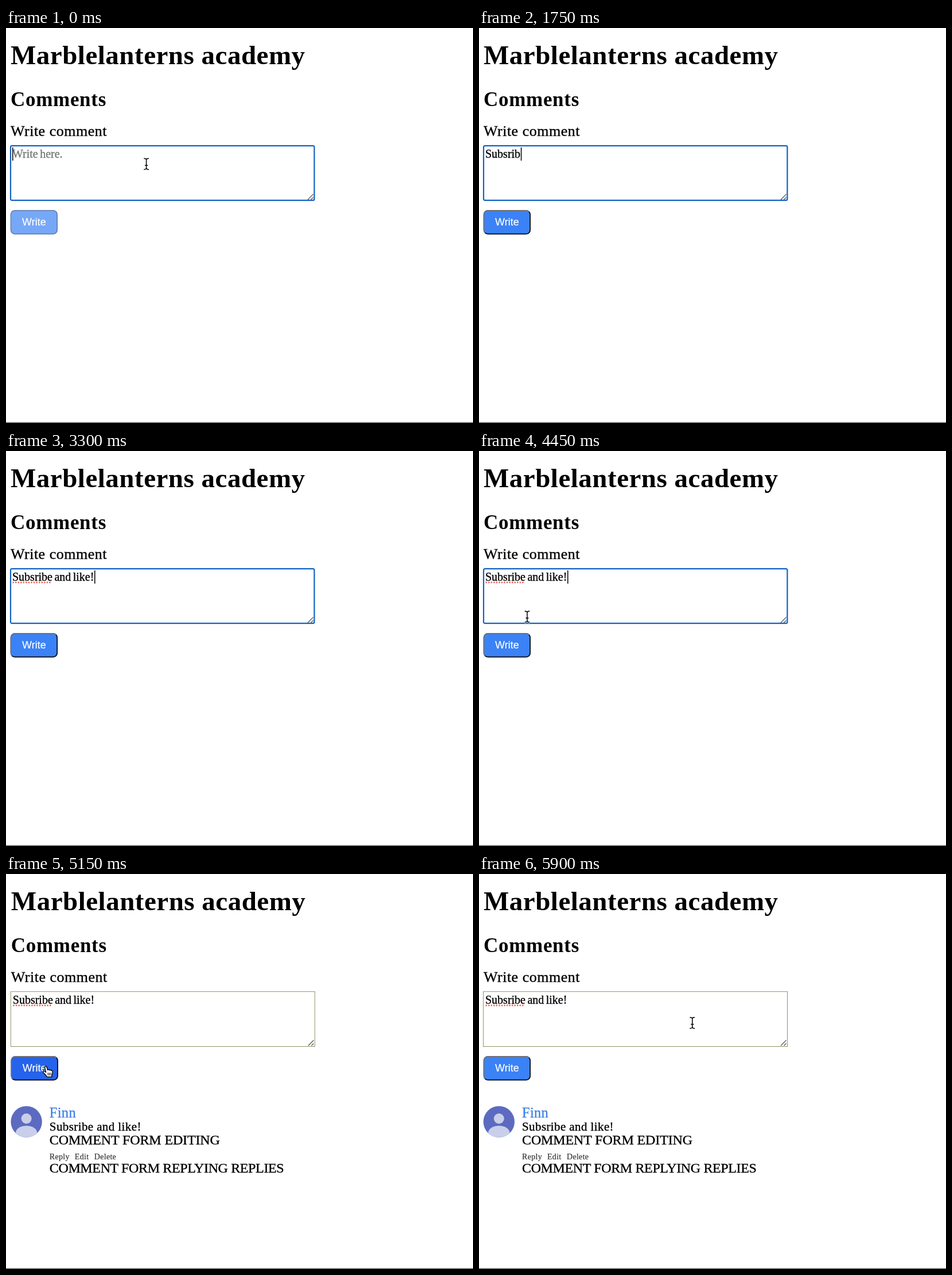
An HTML page for the animation above (6 s loop, 814 by 688 pixels).

```html
<!DOCTYPE html>
<html lang="en">
<head>
<meta charset="utf-8">
<title>Comments</title>
<style>
html, body { margin: 0; width: 100%; height: 100%; overflow: hidden; background: #fff; }
svg { display: block; }
text { font-family: "Liberation Serif", serif; white-space: pre; }
.ink { stroke: #000; stroke-width: .35; }
.field { font-size: 20px; word-spacing: -1.6px; }
.small text { font-size: 14px; letter-spacing: .3px; fill: #333; stroke: #333; stroke-width: .2; }
</style>
</head>
<body>
<svg width="814" height="688" viewBox="0 0 814 688">
  <defs>
    <clipPath id="round"><circle cx="34.8" cy="431.5" r="27.2"/></clipPath>
    <path id="beamShape" d="M-3.8 -9.6Q0 -9.6 0 -7Q0 -9.6 3.8 -9.6M0 -7V7M-3.8 9.6Q0 9.6 0 7Q0 9.6 3.8 9.6M-2 2.5H2"/>
  </defs>
  <rect width="814" height="688" fill="#fff"/>
  <g id="page">
    <text x="8" y="63" font-size="47" font-weight="bold" letter-spacing=".5">Marblelanterns academy</text>
    <text x="8" y="136" font-size="35" font-weight="bold" letter-spacing=".7">Comments</text>
    <text class="ink" x="8" y="188" font-size="26" letter-spacing=".5">Write comment</text>

    <rect id="box" fill="#fff"/>
    <path d="M526 299L535.5 289.5M531.5 299L535.5 295" stroke="#555" stroke-width="1.2"/>
    <text id="hint" class="field" x="11" y="226" fill="#757575" stroke="#757575" stroke-width=".3">Write here.</text>
    <text id="typed" class="field ink" x="11" y="226"></text>
    <path id="spell" d="M12.7 229H77.5" stroke="#f0625c" stroke-width="2.8" stroke-linecap="round" stroke-dasharray="0 4.55"/>
    <rect id="caret" y="208" width="1.5" height="23"/>

    <g id="button">
      <rect id="face" x="7.6" y="317" width="82.4" height="42.6" rx="8"/>
      <g fill="none" stroke-width="1.8">
        <path id="lit" d="M10.6 356.6A7.2 7.2 0 0 1 8.5 351.5V325.2A7.2 7.2 0 0 1 15.7 318H82A7.2 7.2 0 0 1 87.1 320.1"/>
        <path id="shade" d="M87.1 320.1A7.2 7.2 0 0 1 89.2 325.2V351.5A7.2 7.2 0 0 1 82 358.7H15.7A7.2 7.2 0 0 1 10.6 356.6"/>
      </g>
      <text x="28" y="344" font-size="18" fill="#fff" stroke="#fff" stroke-width=".2" style="font-family:'Liberation Sans',sans-serif">Write</text>
    </g>

    <g id="comment">
      <g clip-path="url(#round)">
        <rect x="7" y="404" width="56" height="56" fill="#5c6bc0"/>
        <g fill="#c9cfea">
          <circle cx="34.8" cy="426" r="9"/>
          <path d="M16 460V451C16 443 26 438.5 34.8 438.5S53.5 443 53.5 451V460Z"/>
        </g>
      </g>
      <text x="75" y="424" font-size="24.5" letter-spacing=".3" fill="#3b7fe4" stroke="#3b7fe4" stroke-width=".3">Finn</text>
      <g class="ink">
        <text x="75" y="447" font-size="21" letter-spacing=".4">Subsribe and like!</text>
        <text x="75" y="471" font-size="24" letter-spacing="-.13">COMMENT FORM EDITING</text>
        <text x="75" y="520" font-size="24" letter-spacing="-.37">COMMENT FORM REPLYING REPLIES</text>
      </g>
      <g class="small">
        <text x="75" y="497">Reply</text>
        <text x="119" y="497">Edit</text>
        <text x="153" y="497">Delete</text>
      </g>
    </g>
  </g>
  <rect y="686.6" width="814" height="1.4" fill="#666"/>

  <g id="pointer" stroke-linecap="round" stroke-linejoin="round">
    <g id="beam" fill="none">
      <use href="#beamShape" stroke="#fff" stroke-width="3.2"/>
      <use href="#beamShape" stroke="#000" stroke-width="1.5"/>
    </g>
    <path id="arrow" d="M0 0V16L3.8 12.5L6.4 18.4L9 17.2L6.5 11.5H11.5Z" fill="#000" stroke="#fff" stroke-width="1.2"/>
    <g id="hand">
      <path d="M-1.6 1.2C-1.2 -.6 1.2 -.6 1.8 1L3.8 6.5C4.6 5 6.5 5.2 7 6.8C7.8 5.6 9.6 6 9.9 7.6C11.2 6.8 12.3 7.6 12.2 9.4C12.2 12 11.6 13.4 11 15V18.4H2.4C1.4 15.6 -1.8 13.4 -4 10.6C-5.2 9 -3.2 7.6 -1.6 8.8L.6 10.4Z" fill="#fff" stroke="#000" stroke-width="1.4"/>
      <path d="M4.2 11.5V15.5M6.6 11.5V15.5M9 11.5V15.5" stroke="#000" stroke-width="1"/>
    </g>
  </g>
</svg>
<script>
const LOOP = 6000, STEP = 50;
const MESSAGE = "Subsribe and like!";
// time at which each character of the message is typed
const KEYS = [50, 600, 700, 800, 1000, 1250, 1750, 1900, 1950, 2100,
  2200, 2250, 2400, 2500, 2750, 3000, 3050, 3300];
const HIDE = 50, SHOW = 3450, PRESS = 4750, POST = 4950, SETTLE = 5200;
// time, x, y
const PATH = [
  [0, 244.6, 236.8], [3450, 244.6, 236.8], [3700, 135, 270], [4050, 63, 290],
  [4100, 60, 303], [4200, 60, 308], [4300, 72, 306], [4450, 84, 288.5],
  [4600, 76, 322], [4700, 63, 336], [4750, 60, 338], [4950, 60, 338],
  [5050, 68, 336], [5150, 69, 335], [5300, 120, 306], [5450, 230, 280],
  [5700, 341, 259], [5750, 341, 259], [5900, 371.8, 259.3], [6000, 371.8, 259.3]
];

const el = {};
document.querySelectorAll("[id]").forEach(n => el[n.id] = n);
const show = (n, on) => n.setAttribute("visibility", on ? "inherit" : "hidden");
const set = (n, attrs) => {
  for (const k in attrs) n.setAttribute(k, attrs[k]);
};

function pointerAt(t) {
  const i = PATH.findIndex(p => p[0] > t);
  const [t0, x0, y0] = PATH[i - 1], [t1, x1, y1] = PATH[i];
  const k = (t - t0) / (t1 - t0);
  return [x0 + (x1 - x0) * k, y0 + (y1 - y0) * k];
}

function textEnd(count) {
  return count ? 11 + el.typed.getSubStringLength(0, count) : 11;
}

function drawField(t) {
  const count = KEYS.filter(k => k <= t).length;
  const focused = t < PRESS;
  el.typed.textContent = MESSAGE.slice(0, count);
  show(el.hint, count === 0);
  show(el.spell, count > 8);
  set(el.box, focused
    ? { x: 8, y: 205.2, width: 529.4, height: 95, rx: 2.5, stroke: "#1262c4", "stroke-width": 2.2 }
    : { x: 7.5, y: 204.8, width: 530, height: 95.7, rx: 0, stroke: "#8f9265", "stroke-width": 1 });

  const since = t - (count ? KEYS[count - 1] : 0);
  const lit = count < MESSAGE.length || since % 1000 < 500;
  el.caret.setAttribute("x", textEnd(count) + (count ? .7 : 0));
  show(el.caret, focused && lit);
}

function drawButton(t, hover) {
  const disabled = t < KEYS[0];
  const pressed = t >= PRESS && t < POST;
  const edges = disabled ? ["#10101060", "#10101080"] : ["#707078", "#111"];
  if (pressed) edges.reverse();
  el.button.setAttribute("opacity", disabled ? .69 : 1);
  el.face.setAttribute("fill", hover ? "#2563eb" : "#3b82f6");
  el.lit.setAttribute("stroke", edges[0]);
  el.shade.setAttribute("stroke", edges[1]);
}

function draw(time) {
  const t = Math.floor((time % LOOP) / STEP) * STEP;
  const [x, y] = pointerAt(t);
  const visible = t < HIDE || t >= SHOW;
  const inField = y < 301;
  const hover = x > 8 && x < 90 && y > 317 && y < 359;

  drawField(t);
  drawButton(t, hover);
  show(el.comment, t >= POST);
  el.page.setAttribute("transform", `translate(${t >= POST && t < SETTLE ? .8 : 0} 0)`);

  show(el.pointer, visible);
  el.pointer.setAttribute("transform", `translate(${x} ${y})`);
  show(el.beam, visible && inField);
  show(el.hand, visible && hover);
  show(el.arrow, visible && !inField && !hover);
}

const start = performance.now();
function tick() {
  draw(performance.now() - start);
  requestAnimationFrame(tick);
}
tick();
</script>
</body>
</html>
```
